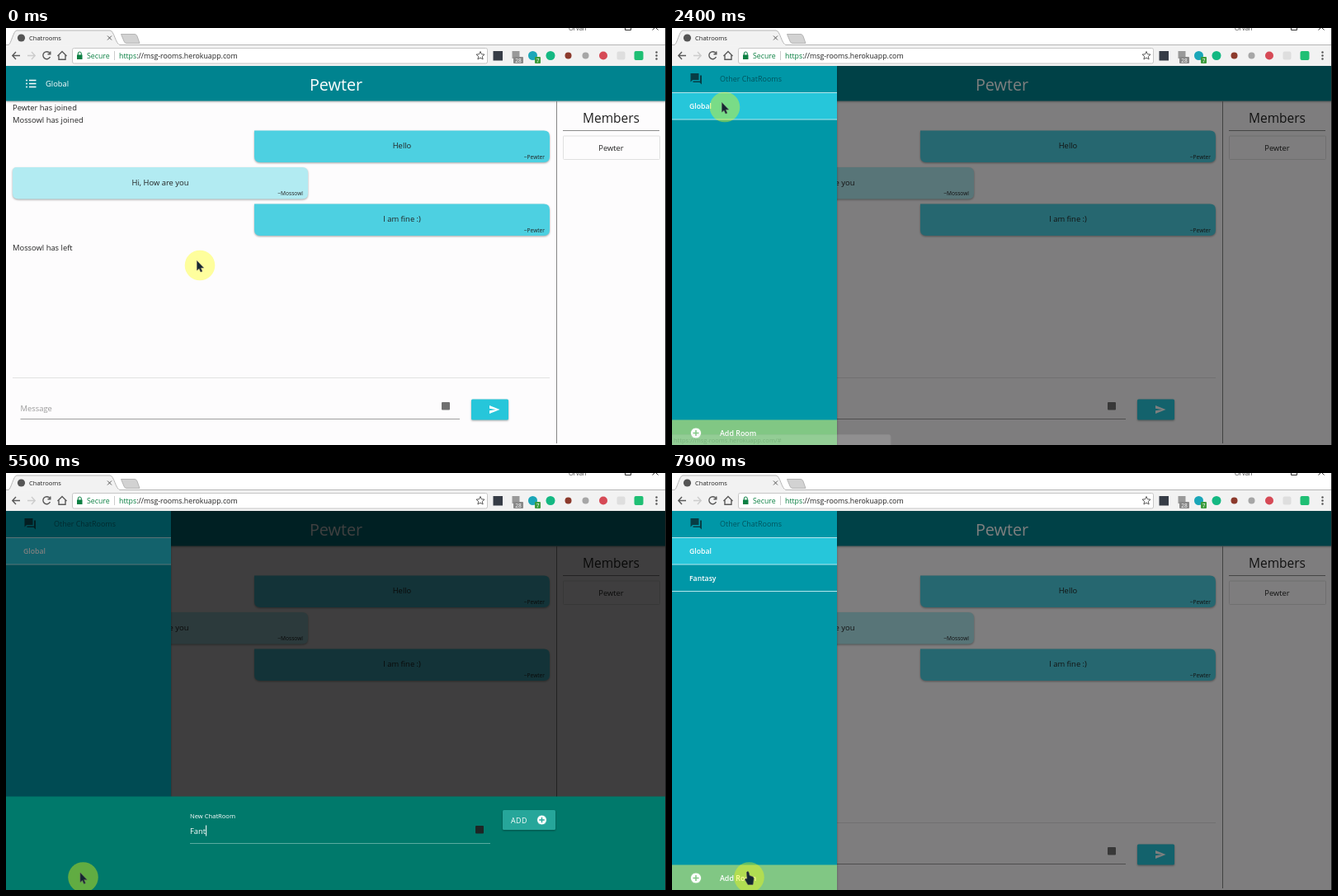
An HTML page for the animation above (8000 ms loop, 800 by 506 pixels).

```html
<!DOCTYPE html>
<html lang="en">
<head>
<meta charset="utf-8">
<title>Chatrooms</title>
<style>
html, body { margin: 0; width: 100%; height: 100%; overflow: hidden; background: #fdfcfd; }
svg { display: block; width: 800px; height: 506px; font: 9.4px "Open Sans", "Noto Sans", sans-serif; fill: #222; }
.line { fill: none; stroke: #5a5a5a; stroke-width: 1.4; }
.mid { text-anchor: middle; }
.end { text-anchor: end; font-size: 6.6px; }
.white { fill: #fff; }
.nav { font-size: 8.7px; font-weight: 600; fill: #fff; }
.lift { filter: drop-shadow(0 1px 1px rgba(0, 0, 0, .35)); }
</style>
</head>
<body>
<svg viewBox="0 0 800 506">
  <defs>
    <clipPath id="addClip"><rect y="475.5" width="200" height="31"/></clipPath>
    <clipPath id="page"><rect y="46" width="800" height="460"/></clipPath>
    <g id="plus"><circle r="6.6" fill="#fff"/><path d="M-3.6 0H3.6M0 -3.6V3.6" stroke-width="1.5"/></g>
  </defs>

  <!-- browser frame -->
  <rect width="800" height="46" fill="#fff"/>
  <rect y="20.5" width="800" height="25.5" fill="#f2f2f2"/>
  <path d="M0 20.5H3C6 20 9 3 13 3H126C131 3 133 20 138 20.5H800" fill="#f2f2f2" stroke="#b5b5b5"/>
  <path d="M4 20.5H137" stroke="#f2f2f2" stroke-width="1.4"/>
  <path d="M139.5 7.5H156Q158 7.5 159 10L162 18.5H146Q144 18.5 143 16Z" fill="#d2d2d2" stroke="#b5b5b5"/>
  <circle cx="18.5" cy="12" r="4.6" fill="#555"/>
  <text x="28" y="15" font-size="7.55">Chatrooms</text>
  <path class="line" d="M123 9.5l5 5m0 -5l-5 5" style="stroke-width:1"/>
  <text x="682" y="3" font-size="7.5" fill="#444">Orvan</text>
  <path class="line" d="M750.5 -3V2.5H757.5V-3M783.5 2.5l3.5 -3.5l3.5 3.5" style="stroke:#333;stroke-width:1"/>
  <path class="line" d="M17 33.5H8M12 29L7.8 33.5L12 38M53 30.5A4.5 4.5 0 1 0 53.5 35M53.8 28.5V31.8H50.5M62.5 34L68 28.5L73.5 34M64 33V38.2H72V33"/>
  <path class="line" d="M26 33.5H35M31 29L35.2 33.5L31 38" style="stroke:#ccc"/>
  <rect x="80.5" y="24.5" width="503" height="18.5" rx="2" fill="#fff" stroke="#c6c6c6"/>
  <rect x="86" y="32.5" width="6.5" height="5.5" fill="#0b8043"/>
  <path d="M87.3 33V31a2 2 0 0 1 4 0V33" fill="none" stroke="#0b8043"/>
  <text x="98" y="37" font-size="8.8" fill="#0b8043">Secure</text>
  <path d="M131.5 28V39" stroke="#ccc"/>
  <text x="137" y="37" font-size="8.8"><tspan fill="#0b8043">https</tspan>://msg-rooms.herokuapp.com</text>
  <path class="line" d="M575 28.5l1.4 3.3 3.6 .3-2.7 2.4 .8 3.5-3.1-1.9-3.1 1.9 .8-3.5-2.7-2.4 3.6-.3z" style="stroke-width:1"/>
  <rect x="590.5" y="28" width="11.5" height="11.5" fill="#363c46"/>
  <rect x="613.5" y="28" width="9" height="9" fill="#999"/>
  <rect x="615" y="35" width="12" height="8" rx="1" fill="#888"/><text class="mid white" x="621" y="41.5" font-size="6.5">28</text>
  <circle cx="638.5" cy="33.5" r="5.5" fill="#1aa6b8"/>
  <rect x="641" y="35" width="7" height="8" rx="1" fill="#3b9b3b"/><text class="mid white" x="644.5" y="41.5" font-size="6.5">7</text>
  <circle cx="660" cy="33.5" r="5.5" fill="#14b882"/>
  <circle cx="681.5" cy="33.5" r="4" fill="#8c3a2c"/>
  <circle cx="702.5" cy="33.5" r="4" fill="#a6a6a6"/>
  <circle cx="724" cy="33.5" r="5" fill="#d64a56"/>
  <rect x="740.5" y="28.5" width="10" height="10" rx="2" fill="#dedede"/>
  <rect x="761.5" y="28" width="11" height="11" rx="2" fill="#1fbf74"/>
  <g fill="#555"><circle cx="788.5" cy="29.5" r="1.2"/><circle cx="788.5" cy="33.5" r="1.2"/><circle cx="788.5" cy="37.5" r="1.2"/></g>

  <g clip-path="url(#page)">
    <!-- chat page -->
    <rect y="46" width="800" height="460" fill="#fdfcfd"/>
    <rect class="lift" y="46" width="800" height="42.5" fill="#00838f"/>
    <path d="M24 63.5h2m2 0h8.5M24 67.5h2m2 0h8.5M24 71.5h2m2 0h8.5" stroke="#fff" stroke-width="1.5"/>
    <text class="white" x="48" y="71">Global</text>
    <text class="mid white" x="400" y="76" font-size="19.8">Pewter</text>
    <text x="8" y="100">Pewter has joined</text>
    <text x="8" y="114.5">Mossowl has joined</text>
    <g id="bubbles"></g>
    <text x="8" y="269.5">Mossowl has left</text>
    <path d="M8 424.5H659" stroke="#e2e2e2"/>
    <text x="17.5" y="464.5" style="fill:#9a9a9a">Message</text>
    <path d="M17.5 474.5H550" stroke="#9e9e9e"/>
    <rect x="528" y="454" width="10" height="9.5" rx="1" fill="#707070"/>
    <rect class="lift" x="564" y="450.5" width="45" height="25" rx="1.5" fill="#26c6da"/>
    <path class="white" d="M586 458L598.5 463L586 468V464.2L594 463L586 461.8Z"/>
    <path d="M667.5 89V504" stroke="#858585"/>
    <text class="mid" x="733.5" y="115" font-size="15.5">Members</text>
    <path d="M675 124.5H792" stroke="#8c8c8c"/>
    <rect x="675.5" y="131" width="117" height="28.5" rx="1" fill="none" stroke="#e0e0e0"/>
    <text class="mid" x="733.5" y="149">Pewter</text>

    <rect id="navShade" y="46" width="800" height="460" fill="#000"/>

    <g id="nav">
      <rect class="lift" y="46" width="200" height="460" fill="#0097a7"/>
      <path d="M22.5 55H32.5V63H25L22.5 65.5ZM34 57.5H36V68.5L33.5 66H25.5V64.5H34Z" fill="#073d45"/>
      <text x="58" y="65" font-size="8.97" fill="#00555f">Other ChatRooms</text>
      <rect y="78" width="200" height="33" fill="#26c6da"/>
      <path d="M0 78.5H200M0 111H200" stroke="#b5e6ec"/>
      <text class="nav" x="21" y="98">Global</text>
      <g id="newRoom"><text class="nav" x="21" y="131">Fantasy</text><path d="M0 143.5H200" stroke="#b5e6ec"/></g>
      <rect y="475.5" width="200" height="31" fill="#81c784"/>
      <g clip-path="url(#addClip)"><circle id="ripple" cx="90.5" cy="491" fill="#000"/></g>
      <use href="#plus" x="29" y="491.5" stroke="#81c784"/>
      <text class="nav" x="58" y="495" style="font-size:8.9px">Add Room</text>
    </g>

    <rect id="modalShade" y="46" width="800" height="460" fill="#000"/>

    <g id="modal">
      <rect y="392.5" width="800" height="114" fill="#00796b"/>
      <text id="label" class="white" x="223" font-weight="500">New ChatRoom</text>
      <text id="typed" class="white" x="223" y="438" font-weight="500"></text>
      <path id="caret" d="M0 427.5V440.5" stroke="#fff"/>
      <path d="M223 449.5H587" stroke="#59ab9f"/>
      <rect x="569" y="428" width="10" height="9.5" rx="1" fill="#1d2625"/>
      <rect class="lift" x="602" y="409" width="64" height="24" rx="1.5" fill="#26a69a"/>
      <text class="white" x="612" y="424.5" font-size="8.9" font-weight="500" letter-spacing=".4">ADD</text>
      <use href="#plus" transform="translate(649.5 421) scale(.9)" stroke="#26a69a"/>
    </g>
  </g>
  <path d="M799.5 0V506" stroke="#222"/>

  <g id="status">
    <path d="M-1 493.5H263Q265 493.5 265 496V507H-1Z" fill="#ebeaeb" stroke="#c4c4c4"/>
    <text x="2" y="503" font-size="7.54" fill="#555">https://msg-rooms.herokuapp.com/#</text>
  </g>

  <g id="cursor" stroke="#5b505c" stroke-width=".6">
    <circle id="halo" r="18.3" fill="#ff0" stroke="none"/>
    <path id="arrow" d="M-3.5 -5.5V6L-.9 3.8L1 8L2.8 7.2L1 3.1H4.6Z" fill="#142630"/>
    <path id="hand" d="M-3 -6Q-1.5 -8 -.5 -6L.5 -2L4.5 -.5Q6 0 5.5 3L4.5 9H-1.5L-5 3Q-5 1 -2.5 2Z" fill="#142630"/>
  </g>
</svg>

<script>
const LOOP = 8000, STEP = 100;
const $ = Object.fromEntries([...document.querySelectorAll("[id]")].map(e => [e.id, e]));
const set = (el, attrs) => { for (const k in attrs) el.setAttribute(k, attrs[k]); };
const show = (el, on) => set(el, { visibility: on ? "visible" : "hidden" });
const clamp = v => Math.max(0, Math.min(1, v));
const span = (t, start, length) => clamp((t - start) / length);
const easeOut = (p, power) => 1 - (1 - p) ** power;
const smooth = p => p * p * (3 - 2 * p);

function bubble(x, y, color, message, author) {
  const start = x > 100 ? `M${x} ${y}` : `M${x} ${y + 5}q0 -5 5 -5`;
  $.bubbles.innerHTML += `
    <path class="lift" fill="${color}" d="${start}H${x + 351}q7 0 7 7v24.5q0 7 -7 7H${x + 7}q-7 0 -7 -7Z"/>
    <text class="mid" x="${x + 179}" y="${y + 21.5}">${message}</text>
    <text class="end" x="${x + 352}" y="${y + 34}">~${author}</text>`;
}
bubble(301, 124.5, "#4dd0e1", "Hello", "Pewter");
bubble(8, 169, "#b2ebf2", "Hi, How are you", "Mossowl");
bubble(301, 213.5, "#4dd0e1", "I am fine :)", "Pewter");

// pointer stops: time, x, y
const path = [
  [0, 235, 288], [200, 235, 288], [1000, 120, 135], [1500, 62, 68], [1800, 62, 70],
  [2000, 64, 83], [2300, 64, 96], [2800, 64, 96], [3400, 93.5, 490.5], [LOOP, 93.5, 490.5]
];
const clicks = [1950, 3600, 7200];
const keys = [4700, 4950, 5200, 5400, 5700, 5950, 6200];
const NAV_OPEN = 1980, MODAL_OPEN = 3558, MODAL_CLOSE = 7137, FOCUS = 4100;

function pointer(t) {
  const i = path.findIndex(p => p[0] > t);
  const [t0, x0, y0] = path[i - 1], [t1, x1, y1] = path[i];
  const p = smooth((t - t0) / (t1 - t0));
  return [x0 + (x1 - x0) * p, y0 + (y1 - y0) * p];
}

function draw(t) {
  const nav = easeOut(span(t, NAV_OPEN, 300), 2);
  set($.nav, { transform: `translate(${-200 * (1 - nav)})` });
  show($.nav, nav > 0);
  set($.navShade, { opacity: nav * .5 });
  set($.newRoom, { opacity: t >= 7400 ? 1 : 0 });

  const ripple = span(t, 3400, 200);
  set($.ripple, { r: 82 * ripple, opacity: .13 * (1 - span(t, 3700, 400)) });

  const modal = easeOut(span(t, MODAL_OPEN, 300), 3) - easeOut(span(t, MODAL_CLOSE, 200), 3);
  set($.modalShade, { opacity: modal * .5 });
  set($.modal, { transform: `translate(0 ${460 * (1 - modal)})` });
  show($.modal, modal > 0);

  const focus = easeOut(span(t, FOCUS, 200), 2);
  set($.label, { y: 438 - 19 * focus, "font-size": 9.4 - 1.8 * focus });
  const count = keys.filter(k => k <= t).length;
  $.typed.textContent = "Fantasy".slice(0, count);
  const lastKey = count ? keys[count - 1] : FOCUS;
  set($.caret, {
    transform: `translate(${223.5 + $.typed.getComputedTextLength()})`,
    opacity: t >= FOCUS && (t - lastKey) % 1000 < 500 ? 1 : 0
  });

  set($.status, { opacity: span(t, 1400, 200) * (1 - span(t, 2150, 300)) });

  const [x, y] = pointer(t);
  set($.cursor, { transform: `translate(${x} ${y})` });
  const press = Math.max(...clicks.map(c => clamp(1 - Math.abs(t - c) / 300)));
  set($.halo, { fill: `rgb(${255 - 35 * press}, ${255 - 35 * press}, ${40 * press})`, "fill-opacity": .38 + .22 * press });
  show($.arrow, t < 7500);
  show($.hand, t >= 7500);
}

function frame() {
  draw(Math.floor(performance.now() % LOOP / STEP) * STEP);
  requestAnimationFrame(frame);
}
frame();
</script>
</body>
</html>
```
